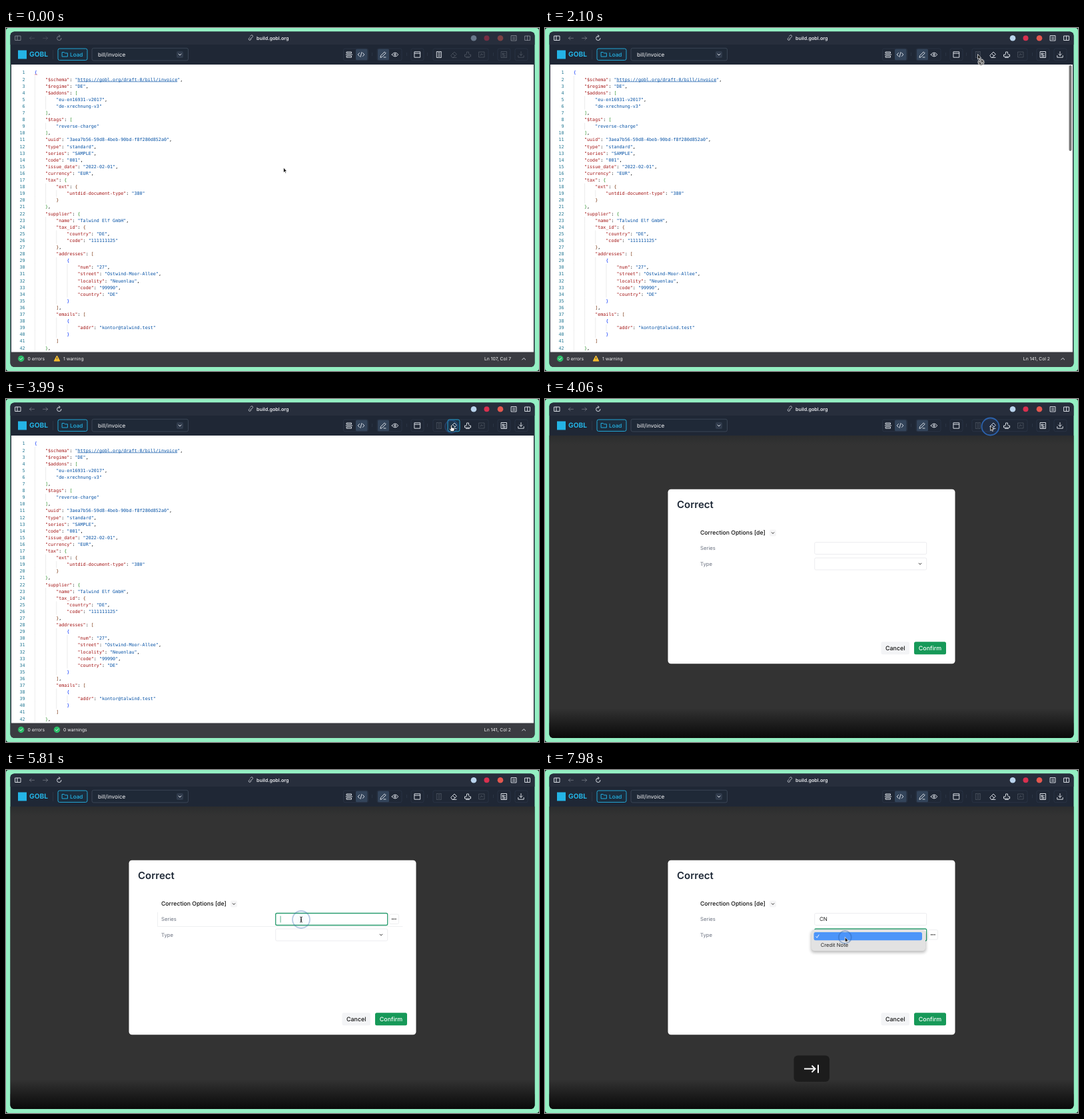
Animation of 800x516 px, one loop 8 s. Source, as an HTML page:

```html
<!DOCTYPE html>
<html lang="en">
<head>
<meta charset="utf-8">
<title>Invoice editor</title>
<style>
html, body { margin: 0; width: 100%; height: 100%; overflow: hidden; background: #0b1512; }
svg { display: block; width: 100%; height: 100%; }
text { font-family: Inter, sans-serif; text-rendering: geometricPrecision; white-space: pre; }
.code text { font: 6.72px "DejaVu Sans Mono", monospace; }
.num { fill: #237893; text-anchor: end; }
.key { fill: #a31515; }
.str { fill: #0451a5; }
.ic { fill: none; stroke: #e2e6ec; stroke-width: .95; stroke-linecap: round; stroke-linejoin: round; }
.box { fill: none; stroke: #2d3748; stroke-width: .8; }
.off { opacity: .2; }
.status { font-size: 6.8px; fill: #f4f4f5; }
.label { font-size: 7.7px; fill: #6b7280; }
.btn { font-size: 8.9px; font-weight: 500; text-anchor: middle; }
.field { fill: #fff; stroke: #e7e8eb; stroke-width: .8; }
.field.focus { stroke: #2a9d6f; stroke-width: 1.3; }
.more rect { fill: #fff; stroke: #e9eaed; stroke-width: .8; }
</style>
</head>
<body>
<svg viewBox="0 0 800 516" preserveAspectRatio="none">
  <defs>
    <linearGradient id="shade" x1="0" y1="0" x2="0" y2="1">
      <stop offset="0" stop-color="#2c2d2e"/>
      <stop offset=".03" stop-color="#333"/>
      <stop offset=".9" stop-color="#333"/>
      <stop offset=".96" stop-color="#191919"/>
      <stop offset="1" stop-color="#090909"/>
    </linearGradient>
    <clipPath id="win"><rect x="6.5" y="5.5" width="787" height="504.5" rx="6"/></clipPath>
    <filter id="soft" x="-20%" y="-50%" width="140%" height="200%"><feGaussianBlur stdDeviation="2"/></filter>
  </defs>

  <rect width="800" height="516" rx="4" fill="#94efc3"/>
  <g clip-path="url(#win)">
    <rect x="6" y="5" width="788" height="506" fill="#1f2735"/>
    <rect x="6" y="5" width="788" height="20" fill="#272e3c"/>
    <rect x="8" y="55" width="784" height="433" fill="#fff"/>
    <g class="code" id="code"></g>
    <path id="squiggle" d="M43 70.6l1-1 1 1 1-1 1 1" fill="none" stroke="#e05050" stroke-width=".7"/>
    <rect id="scroll" x="786.5" y="56" width="4" height="129" rx="2" fill="#777"/>

    <rect x="6" y="487.5" width="788" height="23" fill="#3b3c42"/>
    <circle cx="22.7" cy="497.5" r="4.7" fill="#2bbd68"/>
    <path class="ic" d="M20.7 497.6l1.5 1.5 2.6-3"/>
    <text class="status" x="32.5" y="500">0 errors</text>
    <path id="warn" d="M76.5 493l4.3 8h-8.600z" fill="#fbc02d" stroke="#fbc02d" stroke-linejoin="round"/>
    <path id="bang" d="M76.500 495.500v2.600m0 1.400v.3" stroke="#3b3c42" stroke-width="1"/>
    <g id="fine">
      <circle cx="76.500" cy="497.500" r="4.7" fill="#2bbd68"/>
      <path class="ic" d="M74.500 497.600l1.500 1.500 2.600-3"/>
    </g>
    <text class="status" id="warnings" x="86" y="500"></text>
    <text class="status" id="place" x="758" y="500" text-anchor="end"></text>
    <path class="ic" d="M774.700 499l2.500-2.500 2.500 2.500"/>

    <g id="chrome">
      <path class="ic" d="M14 12h8v6.500h-8zM17 12v6.500M79.800 12.200a3.200 3.200 0 1 0 3.200 3.200M79.500 10.600l1.800 1.600-1.800 1.600"/>
      <path class="ic" style="opacity:.35" d="M42.500 15.300h-7m2.500-2.500l-2.500 2.500 2.500 2.500M55.500 15.300h7m-2.500-2.500l2.500 2.500-2.500 2.500"/>
      <circle cx="702" cy="15.300" r="4.300" fill="#b9d3ec"/>
      <circle cx="721.500" cy="15.300" r="4" fill="#d8304f"/>
      <circle cx="742" cy="15.300" r="4.300" fill="#e3584f"/>
      <path class="ic" d="M758.500 11.500h7.500v7.500h-7.500zM760.500 14h3.500m-3.500 2.500h3.500M779 12h7.500v6.500h-7.500zM782.700 12v6.500"/>
    </g>
    <path class="ic" d="M366.500 16.800l2-2m-2.500-.5l-1.300 1.300a1.600 1.600 0 0 0 2.300 2.300l1.200-1.200m.5-1.900l1.300-1.300a1.600 1.600 0 0 0-2.300-2.300l-1.200 1.200" style="opacity:.75"/>
    <text x="376" y="17.900" font-size="7.200" font-weight="600" fill="#e8eaee">build.gobl.org</text>

    <rect x="18" y="33.500" width="13" height="13" fill="#24b4e6"/>
    <text x="35" y="43.400" font-size="10.200" font-weight="700" fill="#24b4e6">GOBL</text>
    <path class="box" d="M70.500 33v14M549.500 37v5M601.500 37v5M632.500 37v5M731.500 37v5"/>
    <rect x="78" y="31" width="44" height="17.500" rx="2.500" fill="#1b2d3e" stroke="#24b4e6" stroke-width=".9"/>
    <path class="ic" style="stroke:#24b4e6" d="M84.500 36.500h2.800l1.100 1.300h4v5.200h-7.900z"/>
    <text x="96" y="42.700" font-size="8.200" font-weight="500" fill="#24b4e6">Load</text>
    <rect x="129" y="30.300" width="144.500" height="18.700" rx="2.500" fill="#1f2937" stroke="#3d4859" stroke-width=".9"/>
    <text x="138" y="42.700" font-size="8.200" fill="#f3f4f6">bill/invoice</text>
    <rect x="256" y="35" width="10" height="10" rx="2" fill="#303b4c"/>
    <path class="ic" d="M259 39l2 2 2-2"/>

    <g id="tools"></g>

    <g id="dialog">
      <rect x="6" y="55" width="788" height="456" fill="url(#shade)"/>
      <rect x="184.500" y="135.800" width="431" height="262.400" rx="4.500" fill="#fff"/>
      <text x="198" y="163.500" font-size="15" font-weight="600" fill="#1f2937">Correct</text>
      <text x="233" y="204.300" font-size="8.700" font-weight="500" fill="#111">Correction Options [de]</text>
      <rect x="337" y="196.500" width="10" height="10" rx="2" fill="#f5f5f6"/>
      <path class="ic" style="stroke:#222" d="M340.200 200.700l1.800 1.800 1.800-1.800"/>
      <path id="row" d="M227.500 214v21.500h368" fill="none" stroke="#ebecef" stroke-width=".8"/>
      <text class="label" x="233" y="227.200">Series</text>
      <text class="label" x="233" y="250.700">Type</text>
      <rect class="field" id="series" x="404.700" y="215.500" width="168" height="18" rx="2"/>
      <rect class="field" id="type" x="404.700" y="239" width="168" height="18" rx="2"/>
      <path class="ic" style="stroke:#222" d="M561.200 247.100l1.800 1.800 1.800-1.800"/>
      <text id="typed" x="412" y="227.200" font-size="8" fill="#222"></text>
      <rect id="caret" y="219.500" width=".9" height="10" fill="#48a883"/>
      <g class="more" id="more">
        <rect x="575.500" y="217" width="14" height="14.500" rx="2"/>
        <path d="M579 224.300h1.400m1.200 0h1.400m1.200 0h1.400" stroke="#222" stroke-width="1.500"/>
      </g>
      <rect x="504.500" y="365.300" width="42.500" height="19" rx="2.500" fill="#f3f4f6"/>
      <text class="btn" x="525.800" y="378" fill="#111">Cancel</text>
      <rect x="554" y="365.300" width="48" height="19" rx="2.500" fill="#169958"/>
      <text class="btn" x="578" y="378" fill="#fff">Confirm</text>
      <g id="menu">
        <rect x="399" y="242" width="173" height="33" rx="5" fill="#000" opacity=".25" filter="url(#soft)"/>
        <rect x="400" y="240" width="171" height="32" rx="4.500" fill="#e2e2e2"/>
        <rect x="403.500" y="244" width="162.500" height="12.200" rx="2.500" fill="#4c95f9"/>
        <path class="ic" style="stroke:#fff" d="M406.800 250.500l1.500 1.800 2.700-4.300"/>
        <text x="413.700" y="265.700" font-size="7.700" fill="#262626">Credit Note</text>
      </g>
      <g id="tab">
        <rect x="373.500" y="429.500" width="53.500" height="39.500" rx="6" fill="#1c1c1c"/>
        <path d="M389 449.600h16.500m-5-5l5 5-5 5M410 443.500v12.200" fill="none" stroke="#fff" stroke-width="2"/>
      </g>
    </g>
  </g>

  <circle id="ring" fill="#3b82f6" fill-opacity=".08" stroke="#2c62ac" stroke-width="1.800"/>
  <g id="cursor">
    <path data-kind="arrow blocked" d="M0 0V7.600L1.800 6 2.900 8.600 4 8.100 2.900 5.600H5.200Z" fill="#111" stroke="#fff" stroke-width=".7"/>
    <g data-kind="blocked">
      <circle cx="5" cy="12" r="4" fill="#333" stroke="#fff" stroke-width="2"/>
      <path d="M2.200 9.200l5.600 5.600" stroke="#fff" stroke-width="2"/>
      <circle cx="5" cy="12" r="4" fill="none" stroke="#222" stroke-width=".8"/>
      <path d="M2.200 9.200l5.600 5.600" stroke="#222" stroke-width=".8"/>
    </g>
    <path data-kind="hand" d="M-1 .5Q-1-.5-.1-.5T.8.500V3L3.800 3.700Q4.800 4.100 4.600 5.500L3.800 8.700H-.6L-3 5.300Q-3.200 4.200-2 4.600L-1 5.400Z" fill="#fff" stroke="#111" stroke-width=".7"/>
    <path data-kind="beam" d="M-1.800-4Q0-4 0-3V3Q0 4-1.800 4M1.800-4Q0-4 0-3V3Q0 4 1.800 4M-1 .8H1" fill="none" stroke="#222" stroke-width=".9"/>
  </g>
</svg>
<script>
const $ = id => document.getElementById(id);
const show = (id, on) => $(id).setAttribute('opacity', +on);
const clamp = v => Math.min(1, Math.max(0, v));

const json = `{
    "$schema": "https://gobl.org/draft-0/bill/invoice",
    "$regime": "DE",
    "$addons": [
        "eu-en16931-v2017",
        "de-xrechnung-v3"
    ],
    "$tags": [
        "reverse-charge"
    ],
    "uuid": "3aea7b56-59d8-4beb-90bd-f8f280d852a0",
    "type": "standard",
    "series": "SAMPLE",
    "code": "001",
    "issue_date": "2022-02-01",
    "currency": "EUR",
    "tax": {
        "ext": {
            "untdid-document-type": "380"
        }
    },
    "supplier": {
        "name": "Talwind Elf GmbH",
        "tax_id": {
            "country": "DE",
            "code": "111111125"
        },
        "addresses": [
            {
                "num": "27",
                "street": "Ostwind-Moor-Allee",
                "locality": "Neuenlau",
                "code": "99990",
                "country": "DE"
            }
        ],
        "emails": [
            {
                "addr": "kontor@talwind.test"
            }
        ]
    },`;

// Editor: line numbers, indent guides and coloured tokens
const brackets = ['#0431fa', '#319331', '#7b3814'];
let depth = 0;
function token(s) {
  if (/[{[]/.test(s)) return `<tspan fill="${brackets[depth++ % 3]}">${s}</tspan>`;
  if (/[}\]]/.test(s)) return `<tspan fill="${brackets[--depth % 3]}">${s}</tspan>`;
  if (s.endsWith('":')) return `<tspan class="key">${s.slice(0, -1)}</tspan>:`;
  if (s[0] !== '"') return s;
  const body = s.replace(/https[^"]+/, '<tspan text-decoration="underline">$&</tspan>');
  return `<tspan class="str">${body}</tspan>`;
}
$('code').innerHTML = json.split('\n').map((line, i) => {
  const y = 69.4 + i * 10.1;
  const level = line.search(/\S/) / 4;
  let out = `<text class="num" x="28.600" y="${y}">${i + 1}</text>`;
  for (let k = 0; k < level; k++)
    out += `<path d="M${43.4 + k * 16.18} ${y - 7.4}v10.100" stroke="#dedede" stroke-width=".6"/>`;
  const parts = line.trim().match(/"[^"]*":?|[{}[\]]|[^"{}[\]]+/g);
  return out + `<text x="${42.8 + level * 16.18}" y="${y}">${parts.map(token).join('')}</text>`;
}).join('');

// Toolbar: icon centre, path around it, optional id
const icons = [
  [515, 'M-3.500-4h7v2h-7zM-4.800 0h9.600M-3.500 2h7v2.200h-7z'],
  [533, 'M-2.500-2.500l-2.300 2.500 2.300 2.500M2.500-2.500l2.300 2.500-2.300 2.500M.9-3.500l-1.800 7'],
  [566, 'M-4 4l.6-2.500 5.600-5.600 1.900 1.900-5.600 5.600zM1 4h3'],
  [584, 'M-4.800 0Q0-6 4.800 0Q0 6-4.800 0zM-1.300 0a1.300 1.300 0 1 0 2.600 0a1.300 1.300 0 1 0-2.600 0'],
  [617.5, 'M-4.200-4.200h8.400v8.400h-8.400zM-4.200-1.800h8.400'],
  [650, 'M-3.300-4.500h6.600v9h-6.600zM-1.500-2.500h3M-1.500 0h3M-1.500 2.300h3', 'build'],
  [672, 'M-4 1l5-5 3.400 3.400-5 5h-1.400zM-1.500-1.500l3.400 3.400M-1 4.400h5', 'correct'],
  [693, 'M-1.500-1.500v-2.500h3v2.500l1 1.500h2v3h-9v-3h2zM-2.500 4.500h5', 'stamp'],
  [714, 'M-4-4h8v8h-8zM-2 1.500l1.500-3 1 2 1.500-1', 'sign'],
  [747.5, 'M-4-4.500h8v9h-8zM-2-2h1.500v1.500h-1.500zM1-1.500h1M-2 1h4M-2 2.800h4', 'doc'],
  [773, 'M0-4.500v5.800m-2.300-2.300l2.300 2.300 2.300-2.300M-4.200 1.500v2.700h8.400v-2.700', 'save']
];
const frames = [[506.5, 37], [557, 37], [608, 19], [641, 83], [738, 19], [764, 19]];
$('tools').innerHTML =
  '<rect x="525" y="31.500" width="17.500" height="17" rx="2" fill="#33445a"/>' +
  '<rect x="558" y="31.500" width="17" height="17" rx="2" fill="#33445a"/>' +
  frames.map(([x, w]) => `<rect class="box" x="${x}" y="31" width="${w}" height="17.800" rx="2.500"/>`).join('') +
  '<rect id="hover" x="663" y="31" width="18" height="17.800" rx="2.500" fill="#1c3346" stroke="#24b4e6" stroke-width=".9"/>' +
  icons.map(([x, d, id = '']) =>
    `<path class="ic" id="${id}" transform="translate(${x} 40)" d="${d}"/>`).join('');
const enable = (id, on) => $(id).classList.toggle('off', !on);

// Pointer: start, end, target
const moves = [[140, 1190, 649.5, 39.5], [2940, 3640, 668.5, 40], [4340, 5460, 443, 225], [7240, 7840, 450.3, 251.5]];
const clicks = [1740, 3960, 5520, 7950];
function pointer(t) {
  let x = 416.5, y = 210;
  for (const [a, b, tx, ty] of moves) {
    const p = clamp((t - a) / (b - a));
    const e = p * p * (3 - 2 * p);
    x += (tx - x) * e;
    y += (ty - y) * e;
  }
  return [x, y];
}
function kindAt(t, x, y) {
  if (t >= 4060) return x > 404 && x < 573 && y > 215 && y < 234 ? 'beam' : 'arrow';
  if (x < 641 || y > 50) return 'arrow';
  return t >= 2100 && x < 661 ? 'blocked' : 'hand';
}

function draw(t) {
  const [x, y] = pointer(t);
  const kind = kindAt(t, x, y);
  const built = t >= 2100, open = t >= 4060, clean = t >= 2870;

  $('cursor').setAttribute('transform', `translate(${x} ${y})`);
  show('cursor', t < 6090 || t >= 7280);
  for (const el of $('cursor').children)
    el.style.display = el.dataset.kind.split(' ').includes(kind) ? '' : 'none';

  const age = t - clicks.filter(c => c <= t).pop();
  $('ring').setAttribute('cx', x);
  $('ring').setAttribute('cy', y + (open && t > 5000 ? 0 : 1.5));
  $('ring').setAttribute('r', 8 + 5 * clamp(age / 100));
  show('ring', age >= 0 ? Math.min(clamp(.15 + age / 110), clamp((330 - age) / 120)) : 0);

  show('chrome', t < 1750 ? .45 : 1);
  enable('build', !built);
  ['correct', 'stamp', 'doc', 'save'].forEach(id => enable(id, built));
  enable('sign', false);
  show('hover', kind === 'hand' && x > 661);
  show('squiggle', t < 2100);
  show('scroll', built ? clamp((3220 - t) / 350) : 0);
  show('warn', !clean);
  show('bang', !clean);
  show('fine', clean);
  $('warnings').textContent = clean ? '0 warnings' : '1 warning';
  $('place').textContent = built ? 'Ln 141, Col 2' : 'Ln 107, Col 7';

  show('dialog', open);
  const text = t < 6090 ? '' : t < 6230 ? 'C' : 'CN';
  const onSeries = t >= 5600 && t < 6720;
  $('typed').textContent = text;
  $('series').classList.toggle('focus', onSeries);
  $('type').classList.toggle('focus', t >= 6720);
  $('caret').setAttribute('x', 411.6 + text.length * 6.2);
  show('caret', onSeries && (t - 5600) % 1050 < 560);
  const inRow = x > 227 && x < 596 && y > 212 && y < 259;
  const drop = y > 236 ? 23.5 : 0;
  show('more', inRow);
  show('row', inRow && !drop);
  $('more').setAttribute('transform', `translate(0 ${drop})`);
  show('menu', t >= 7980);
  show('tab', clamp((t - 6650) / 140));
}

const start = performance.now();
function tick() {
  const t = (performance.now() - start) % 8000;
  draw(Math.floor(t / 70) * 70);
  requestAnimationFrame(tick);
}
tick();
</script>
</body>
</html>
```
